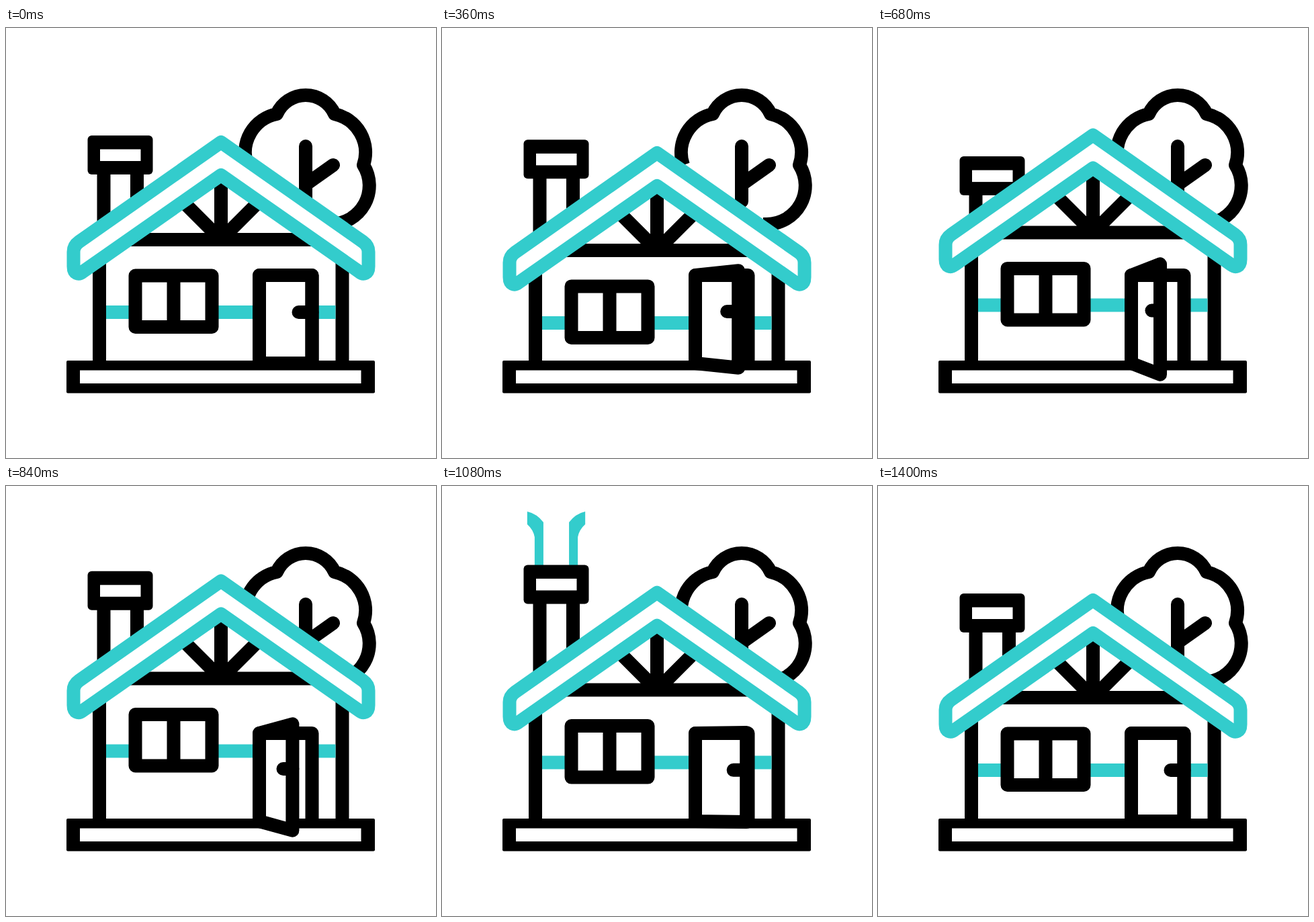
These frames come from a looping animation (640x640 px, 1560 ms). An HTML page:

```html
<!DOCTYPE html>
<html lang="en">
<head>
<meta charset="utf-8">
<title>House</title>
<style>
  html, body { margin: 0; height: 100%; overflow: hidden; background: #fff; }
  svg { display: block; width: 100vw; height: 100vh; }
  .line { stroke: #000; stroke-width: 20; stroke-linejoin: round; fill: none; }
  .round { stroke-linecap: round; }
  .teal { stroke: #33cccc; }
  .white { fill: #fff; }
</style>
</head>
<body>
<svg viewBox="0 0 640 640">
  <!-- tree -->
  <path class="line" d="M359 204A58.6 58.6 0 0 1 403 128A47 47 0 0 1 489 128A58.6 58.6 0 0 1 532 204A57.5 57.5 0 0 1 483 292H478"/>
  <path class="line round" d="M446 176V258M446 233L487 204"/>

  <path id="smoke" fill="#33cccc" d="M-43 0Q-29 3 -19 16V80H-32V38Q-34 27 -43 19ZM43 0Q29 3 19 16V80H32V38Q34 27 43 19Z"/>

  <path id="flue" class="line"/>
  <g id="cap">
    <rect x="121.500" y="160" width="97" height="58" rx="6"/>
    <rect class="white" x="140" y="180.500" width="60.500" height="17.500"/>
  </g>

  <g id="house">
    <path class="line" d="M139 330V524M500.500 330V524M165 315H475M320 225V315M262 257L320 315L378 257"/>
    <path class="line teal" d="M149 423H490.500"/>
    <path class="line white" d="M192.500 368.500H306.500V445H192.500Z"/>
    <path class="line" d="M249.500 368V445"/>
    <path class="line teal white" d="M320 170L109 318Q100.500 324 100.500 333V355C100.500 366 108 368 114 363L320 219L526 363C532 368 539.500 366 539.500 355V333Q539.500 324 531 318Z"/>
  </g>

  <!-- base -->
  <rect x="90" y="495" width="459" height="48.500" rx="2"/>
  <rect class="white" x="110" y="509.500" width="418.500" height="19.500"/>

  <!-- door -->
  <path class="white" d="M377 368H455V495H377Z"/>
  <path id="panel" class="white"/>
  <path class="line" d="M377 499V368H455.500V499"/>
  <path id="leaf" class="line"/>
  <path id="handle" class="line round"/>
</svg>
<script>
  const LOOP = 1560, STEP = 40, LAST = 1400;
  const el = id => document.getElementById(id);

  // Each key is [time, value]; values ease in and out between keys.
  const houseKeys = [[0, 0], [480, 18.6], [490, 18.6], [820, -28.6], [1280, 0]];
  const capKeys = [[280, 0], [570, 36], [638, 36], [900, -43], [1060, -43], [1380, 0]];
  const doorKeys = [[150, 0], [630, 35.5], [720, 35.5], [1150, 0]];
  const smokeTopKeys = [[900, 118], [1080, 38]];
  const smokeTailKeys = [[1100, 118], [1360, 38]];
  const smokeSpreadKeys = [[1070, 1], [1320, 2]];

  function tween(keys, t) {
    if (t <= keys[0][0]) return keys[0][1];
    for (let i = 1; i < keys.length; i++) {
      const [t0, a] = keys[i - 1], [t1, b] = keys[i];
      if (t <= t1) return a + (b - a) * (1 - Math.cos(Math.PI * (t - t0) / (t1 - t0))) / 2;
    }
    return keys[keys.length - 1][1];
  }

  function draw(t) {
    const lift = tween(houseKeys, t), cap = tween(capKeys, t), open = tween(doorKeys, t);

    el('house').setAttribute('transform', `translate(0 ${lift})`);
    el('cap').setAttribute('transform', `translate(0 ${cap})`);
    el('flue').setAttribute('d', `M145.500 ${205 + cap}V${Math.max(310 + lift, 205 + cap)}M195 ${205 + cap}V${Math.max(285 + lift, 205 + cap)}`);

    const edge = 455.5 - open, skew = 0.47 * open, knob = 423 - 0.07 * open;
    const leaf = `M377 368L${edge} ${368 - skew}V${499 + skew}L377 499Z`;
    el('panel').setAttribute('d', leaf);
    el('leaf').setAttribute('d', leaf);
    el('handle').setAttribute('d', `M${edge - 20 + 0.21 * open} ${knob}H${edge}`);

    const top = tween(smokeTopKeys, t), height = tween(smokeTailKeys, t) - top;
    el('smoke').setAttribute('visibility', height > 0.5 ? 'visible' : 'hidden');
    el('smoke').setAttribute('transform', `translate(170 ${top}) scale(${tween(smokeSpreadKeys, t)} ${height / 80})`);
  }

  const start = performance.now();
  function tick() {
    const t = (performance.now() - start) % LOOP;
    draw(Math.min(LAST, Math.floor(t / STEP) * STEP));
    requestAnimationFrame(tick);
  }
  tick();
</script>
</body>
</html>
```
